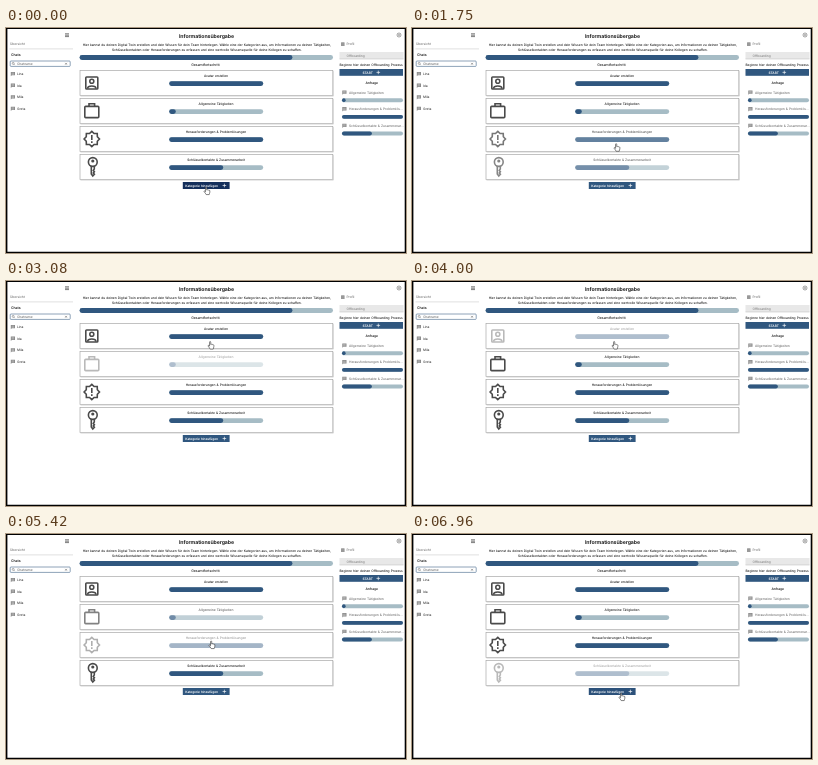
An HTML page that plays this animation: 400x225 px, repeating every 7000 ms.

```html
<!DOCTYPE html>
<html lang="de">
<head>
<meta charset="utf-8">
<title>Informationsübergabe</title>
<style>
  html, body { margin: 0; width: 100%; height: 100%; overflow: hidden; background: #fff; }
  svg { display: block; width: 100vw; height: 100vh; }
  text {
    font-family: Inter, "Liberation Sans", sans-serif;
    text-rendering: geometricPrecision;
    letter-spacing: -.015em;
    word-spacing: .09em;
  }
</style>
</head>
<body>
<svg id="stage" viewBox="0 0 400 225"></svg>
<script>
const LOOP = 7000;
const BLUE = '#30577f', NAVY = '#142f5b', PALE = '#a6bcc5', INK = '#222', GRAY = '#777';

const rect = (x, y, w, h, fill, extra = '') =>
  `<rect x="${x}" y="${y}" width="${w}" height="${h}" fill="${fill}" ${extra}/>`;

const line = (d, color, width) =>
  `<path d="${d}" fill="none" stroke="${color}" stroke-width="${width}"/>`;

// y is the middle of the capital letters
const label = (x, y, str, { size = 3.27, fill = INK, weight = 500, anchor = 'start' } = {}) =>
  `<text x="${x}" y="${y + size * 0.36}" font-size="${size}" fill="${fill}" font-weight="${weight}" text-anchor="${anchor}">${str.replace('&', '&amp;')}</text>`;

const middle = (x, y, str, opts) => label(x, y, str, { ...opts, anchor: 'middle' });

const bar = (x, y, w, h, part) =>
  rect(x, y, w, h, PALE, `rx="${h / 2}"`) + rect(x, y, w * part, h, BLUE, `rx="${Math.min(h, w * part) / 2}"`);

const plus = (x, y) => line(`M${x - 1.8} ${y}h3.6M${x} ${y - 1.8}v3.6`, '#fff', 0.65);

const bubble = (x, y) =>
  `<path d="M${x - 2} ${y - 2}h4.2v3.3h-3.2l-1 1z" fill="#888"/>` +
  line(`M${x - 1.2} ${y - 0.9}h2.6M${x - 1.2} ${y + 0.3}h2.6`, '#fff', 0.35);

const burst = Array.from({ length: 16 }, (_, i) => {
  const r = i % 2 ? 6 : 7.7, a = i * Math.PI / 8;
  return `${(r * Math.sin(a)).toFixed(2)},${(-r * Math.cos(a)).toFixed(2)}`;
}).join(' ');

const icons = [
  `<rect x="-6" y="-6" width="12" height="12" rx=".8"/><circle cy="-1.7" r="2"/><path d="M-4.2 5.6C-4 2.2 4 2.2 4.2 5.6"/>`,
  `<rect x="-7" y="-4.6" width="14" height="11.2" rx=".9"/><path d="M-2.8-4.8v-2.4h5.6v2.4"/>`,
  `<polygon points="${burst}"/><path d="M0-3.9V1M0 2.3v1.7"/>`,
  `<circle cx="1" cy="-5" r="4.4"/><circle cx="1" cy="-6" r=".8"/><path d="M-.5-1V7L1 9 2.6 7.3 1.5 6 2.6 4.7 1.5 3.4 2.5 2V-1"/>`
];

const cards = [
  { title: 'Avatar erstellen', part: 1, fades: [[3090, 3560, 4440, 5000]] },
  { title: 'Allgemeine Tätigkeiten', part: 0.07, fades: [[2320, 2800, 3090, 3560], [4450, 4950, 5150, 5700]] },
  { title: 'Herausforderungen & Problemlösungen', part: 1, fades: [[1550, 2050, 2300, 2800], [5130, 5450, 5950, 6500]] },
  { title: 'Schlüsselkontakte & Zusammenarbeit', part: 0.575, fades: [[700, 1250, 1500, 2050], [5980, 6500, 7500, 8000]] }
];

const cardMarkup = ({ title, part }, i) => {
  const top = 42.5 + 28 * i;
  return rect(74, top, 252.8, 25, '#fff', 'stroke="#a9a9a9" stroke-width=".7"') +
    line(`M74.5 ${top + 25.6}h252.9v-25`, '#ccc', 0.7) +
    `<g id="card${i}">
      <g transform="translate(85.8 ${top + 12.5})" fill="none" stroke="#4a4a4a" stroke-width="1.6">${icons[i]}</g>
      ${middle(210, top + 5.7, title)}${bar(163.2, top + 10.8, 94, 4.6, part)}
    </g>`;
};

const chats = ['Lina', 'Ida', 'Mila', 'Greta'];

const sidebar =
  line('M59 5.8h4M59 7.2h4M59 8.6h4', '#444', 0.7) +
  label(4, 16.3, 'Übersicht', { fill: GRAY }) +
  line('M3.5 20.9h63.5', '#ccc', 0.6) +
  label(5, 27, 'Chats', { weight: 600, size: 3.5 }) +
  rect(4.2, 33, 60, 5.4, '#fff', `rx=".8" stroke="${BLUE}" stroke-width=".55"`) +
  `<circle cx="7.2" cy="35.4" r="1" fill="none" stroke="#555" stroke-width=".45"/>` +
  line('M7.9 36.1l1 1', '#555', 0.45) +
  label(11, 35.7, 'Chatname', { fill: GRAY }) +
  line('M59.2 34.9l1.7 1.7m0-1.7l-1.7 1.7', '#444', 0.5) +
  chats.map((name, i) => bubble(6.8, 46 + 11.6 * i) + label(11, 46 + 11.6 * i, name, { fill: '#444' })).join('');

const shorten = title => title.length > 30 ? title.slice(0, 30) + '…' : title;
const topics = [['Allgemeine Tätigkeiten', 0.06], [cards[2].title, 1], [cards[3].title, 0.49]];

const panel =
  `<circle cx="393" cy="7" r="2" fill="none" stroke="#666" stroke-width=".6"/><circle cx="393" cy="7" r=".8" fill="#666"/>` +
  rect(335, 14.3, 3.6, 3.8, '#999', 'rx=".4"') +
  label(340.5, 16.3, 'Profil', { fill: GRAY }) +
  rect(333.5, 24, 64, 7, '#e8e8e8') + line('M333.5 31h64', '#aaa', 0.4) +
  label(340.5, 27.5, 'Offboarding', { fill: '#888' }) +
  label(333.5, 37, 'Beginne hier deinen Offboarding Prozess') +
  rect(333.5, 41, 63.5, 6.8, BLUE) +
  middle(361.7, 44.4, 'START', { fill: '#fff', weight: 600 }) + plus(372.3, 44.4) +
  middle(365.7, 54.4, 'Anfrage', { weight: 600 }) +
  topics.map(([title, part], i) => {
    const y = 64.5 + 16.6 * i;
    return bubble(338.3, y) + label(343, y, shorten(title), { fill: GRAY }) + bar(336, y + 5.8, 61, 3.9, part);
  }).join('');

const main =
  middle(200.5, 8.1, 'Informationsübergabe', { size: 5.2, weight: 700 }) +
  middle(200.8, 17.3, 'Hier kannst du deinen Digital Twin erstellen und dein Wissen für dein Team hinterlegen. Wähle eine der Kategorien aus, um Informationen zu deinen Tätigkeiten,') +
  middle(200.8, 22.2, 'Schlüsselkontakten oder Herausforderungen zu erfassen und eine wertvolle Wissensquelle für deine Kollegen zu schaffen.') +
  bar(73.6, 27.1, 253.4, 4.9, 0.84) +
  middle(199.5, 37.2, 'Gesamtfortschritt', { size: 3.5 }) +
  cards.map(cardMarkup).join('') +
  rect(176.8, 154, 46.8, 7, BLUE, 'id="add"') +
  label(179.3, 157.5, 'Kategorie hinzufügen', { fill: '#fff', weight: 600, size: 3.2 }) + plus(218.4, 157.5);

const hand = `<g id="cursor"><path transform="scale(.92)" d="M-1.6-3.6c0-1 1.3-1 1.3 0v2.5c.3-.5 1.1-.4 1.2.1.4-.4 1.1-.2 1.1.3.4-.3 1.1-.1 1.1.5v1.5c0 1.2-.7 1.5-.7 2.6h-3.3c-.2-1-1.6-2-2.2-3.2-.3-.8.6-1.2 1.1-.5l.4.5z" fill="#fff" stroke="#222" stroke-width=".6" stroke-linejoin="round"/></g>`;

const frame = line('M.7 0V225M399.4 0V225', '#000', 1.4) + line('M0 .4H400M0 224.4H400', '#000', 1.1);

const stage = document.getElementById('stage');
stage.innerHTML = `<clipPath id="edge"><rect width="398.4" height="225"/></clipPath>` +
  rect(0, 0, 400, 225, '#fff') + sidebar + main + `<g clip-path="url(#edge)">${panel}</g>` + frame + hand;

const cardNodes = cards.map((_, i) => document.getElementById('card' + i));
const addButton = document.getElementById('add');
const cursor = document.getElementById('cursor');

// time, x, y
const path = [
  [0, 201, 163], [580, 201, 163], [1000, 204, 148], [1420, 204, 148], [1700, 205, 120],
  [2130, 205, 112], [2280, 205, 92.5], [2920, 205, 88], [3060, 205, 64.5], [3670, 205, 64.5],
  [4000, 203, 64.5], [4330, 203, 86], [4750, 203, 86], [5080, 206, 109], [5420, 206, 111],
  [5830, 206, 126], [6000, 206, 126], [6580, 207, 148], [6750, 207, 148], [6950, 210, 163], [LOOP, 210, 163]
];

const progress = (t, from, to) => Math.min(1, Math.max(0, (t - from) / (to - from)));
const smooth = p => p * p * (3 - 2 * p);
const mix = (a, b, p) => a + (b - a) * p;

function cursorAt(t) {
  const i = path.findIndex(key => key[0] > t);
  const [t0, x0, y0] = path[i - 1], [t1, x1, y1] = path[i];
  const p = smooth(progress(t, t0, t1));
  return [mix(x0, x1, p), mix(y0, y1, p)];
}

function render(t) {
  cards.forEach(({ fades }, i) => {
    const faded = fades.reduce((sum, [a, b, c, d]) => sum + progress(t, a, b) - progress(t, c, d), 0);
    cardNodes[i].setAttribute('opacity', 1 - 0.62 * faded);
  });
  const hover = 1 - progress(t, 620, 900) + 0.15 * progress(t, 6850, 6960);
  addButton.style.fill = `color-mix(in srgb, ${NAVY} ${hover * 100}%, ${BLUE})`;
  cursor.setAttribute('transform', `translate(${cursorAt(t).join(' ')})`);
}

const start = performance.now();
function tick() {
  render((performance.now() - start) % LOOP);
  requestAnimationFrame(tick);
}
tick();
</script>
</body>
</html>
```
